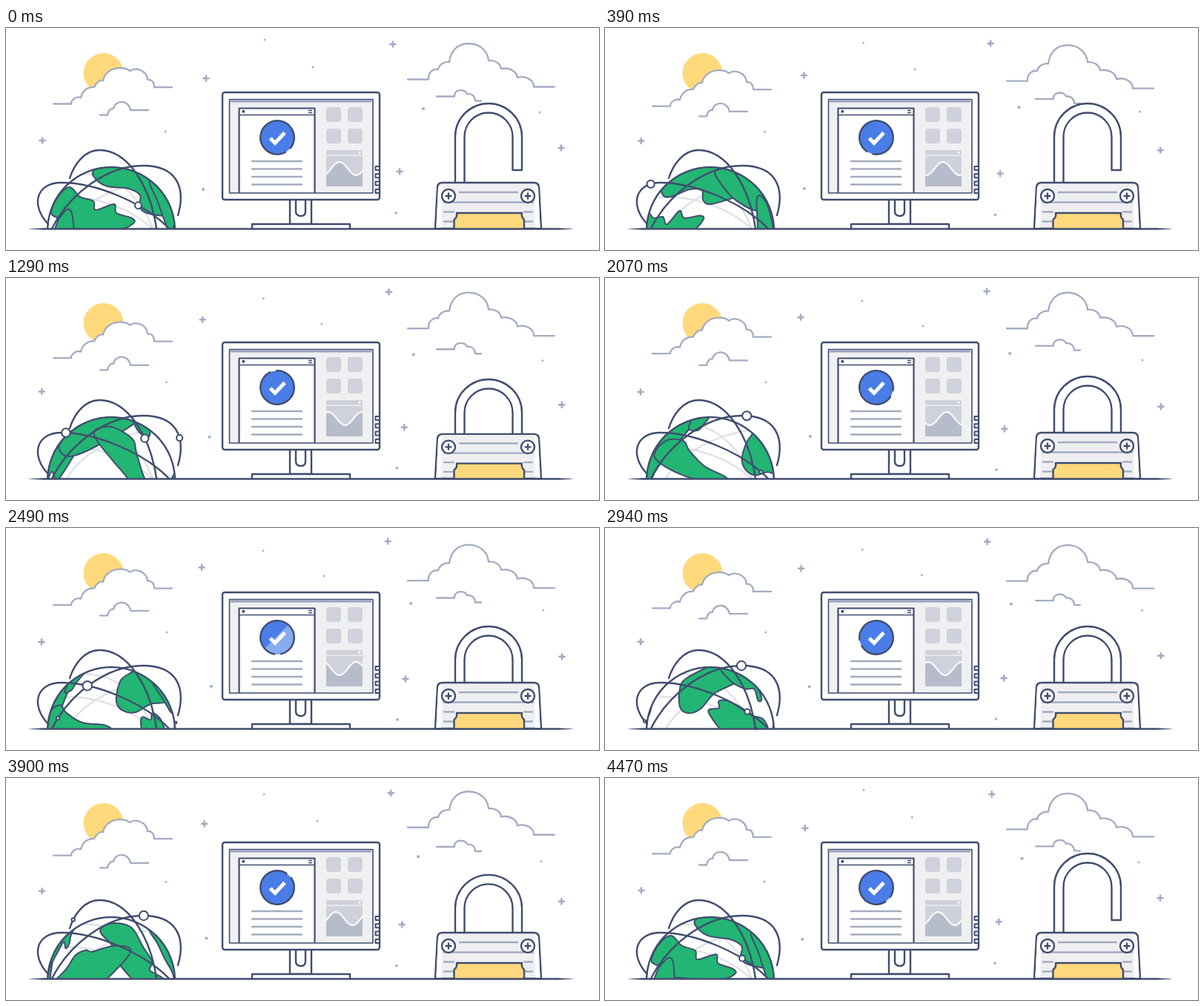
These frames come from a looping animation (800x300 px, 4500 ms). An HTML page:

```html
<!DOCTYPE html>
<html lang="en">
<head>
<meta charset="utf-8">
<title>Secure connection</title>
<style>
  html, body { margin: 0; width: 100%; height: 100%; overflow: hidden; background: #fff; }
  svg { display: block; width: 800px; height: 300px; }
  .ink { fill: none; stroke: #404d6e; stroke-width: 2.4; stroke-linecap: round; stroke-linejoin: round; }
  .white { fill: #fff; }
  .cloud { fill: #fff; stroke: #a3acc3; stroke-width: 2.3; stroke-linecap: round; stroke-linejoin: round; }
  .soft { fill: none; stroke: #a3acbf; stroke-width: 2.4; stroke-linecap: round; }
  .back { fill: none; stroke: #e0e2e7; stroke-width: 2.4; }
  .land { fill: #22b573; stroke: #404d6e; stroke-width: 2; stroke-linejoin: round; }
  .tile { fill: #cfd2dc; }
</style>
</head>
<body>
<svg viewBox="0 0 800 300">
  <defs>
    <clipPath id="above"><rect width="800" height="271"/></clipPath>
    <clipPath id="dome"><circle cx="142" cy="274" r="86"/></clipPath>
    <clipPath id="disc"><circle cx="366" cy="148" r="22"/></clipPath>
    <clipPath id="panel"><rect x="432" y="173" width="49" height="41"/></clipPath>
  </defs>

  <g id="sky"></g>
  <circle cx="131.5" cy="61" r="27" fill="#ffd97b"/>
  <g class="cloud">
    <path id="cloud0" d="M64 102.5H88C88 96 96 92 101 94C103 85 110 79 119 80C122 73 127 70 131 71C133 60 143 54 154 54C160 54 165 56 167 58C176 52 190 58 191 70C196 69 200 73 200 80H224"/>
    <path id="cloud1" d="M127 117.5H137C138 111 142 108 145 109C147 97 165 96 168 111H192"/>
    <path id="cloud2" d="M542 69.5H570C569 60 577 54 583 56C584 49 592 45 598 46C600 30 610 21 624 21C639 21 650 31 651 44C660 43 667 48 668 55C678 53 689 58 690 67C700 64 712 69 712 79.5H740"/>
    <path id="cloud3" d="M581 92.5H605C604 82 620 82 622 89C629 88 633 93 633 98.5H641"/>
  </g>

  <g clip-path="url(#above)">
    <g clip-path="url(#dome)">
      <rect x="50" y="180" width="190" height="100" fill="#fff"/>
      <g class="back">
        <path d="M72 229C110 225 165 240 197 271"/>
        <path d="M82 271C100 240 140 215 196 205"/>
        <path d="M104 198C145 195 180 225 198 271"/>
      </g>
      <g id="lands" class="land"></g>
    </g>
    <circle class="ink" cx="142" cy="274" r="86"/>
  </g>
  <g class="ink">
    <path d="M86 203C92 184 106 165 126 165C165 165 195 215 203 271"/>
    <path d="M220 271C185 235 120 209 75 209C40 209 33 240 57 265"/>
    <path d="M62 271C85 225 135 186 185 186C230 186 243 215 232 253"/>
  </g>
  <g id="nodes" class="ink"></g>

  <g class="ink">
    <path class="white" d="M383 232V265H412V232M391 232V248Q391 254 398 254Q404 254 404 248V232"/>
    <path class="white" d="M332 271V265H464V271"/>
    <rect class="white" x="292" y="87" width="212" height="145" rx="3"/>
    <rect x="301.5" y="96.5" width="193.5" height="126.5" style="fill:#f0f0f2;stroke-width:1.6"/>
    <path d="M303 99H493" style="stroke:#98a2c0;stroke-width:3;stroke-linecap:butt"/>
    <g id="keys" class="white" style="stroke-width:2"></g>
    <path class="white" d="M314.5 222V108.500H416.500V222" style="stroke-width:2.2"/>
    <path d="M315 117.500H416" style="stroke-width:1.6"/>
    <path d="M408.500 111.500H412.500M408.500 114.500H412.500" style="stroke-width:1.4"/>
    <rect x="318.500" y="111" width="3.500" height="3.500" style="fill:#404d6e;stroke:none"/>
  </g>
  <path class="soft" d="M332 180H399M332 190.500H399M332 201H399M332 211.500H399"/>
  <circle cx="366" cy="148" r="22.800" fill="#4a7de8"/>
  <g clip-path="url(#disc)"><g transform="translate(366 148) rotate(45)">
    <rect id="shine" y="-30" width="42" height="60" fill="#fff" opacity=".35"/>
  </g></g>
  <path d="M356.500 149L363 155.500L376 141.500" fill="none" stroke="#fff" stroke-width="5"/>
  <circle id="ring" class="ink" cx="366" cy="148" r="22.800" pathLength="360" stroke-dasharray="342 18" style="stroke-linecap:butt"/>
  <g id="tiles" class="tile">
    <rect x="432" y="165" width="49" height="6.500"/><rect x="432" y="173" width="49" height="41"/>
  </g>
  <circle cx="477" cy="168" r="1.500" fill="#fff"/>
  <path id="wave" clip-path="url(#panel)" fill="#b6bccb" stroke="#fff" stroke-width="2"/>

  <path id="shackle" class="ink white" d="M606 225V147A45 45 0 0 1 696 147V192H683.500V147A32.500 32.500 0 0 0 618.500 147V225"/>
  <g id="lock" class="ink">
    <path d="M579 271L582 215Q582.500 209 589 209H712Q718.500 209 719 215L722 271Z" style="fill:#efeff2"/>
    <path d="M583 215L580.500 270H587L588.500 212ZM718 215L720.500 270H714L712.500 212Z" style="fill:#fff;stroke:none"/>
    <path class="soft" d="M612 222H690M591 235.500H711M591 248.500H604M699 248.500H710M591 261.500H602M701 261.500H710" style="stroke:#a3acc3"/>
    <path d="M604.500 271V259Q609 256 608 250H696Q695 256 699 259V271" style="fill:#ffd97b"/>
    <g id="screw0"><circle class="white" r="9"/><path d="M-3.500 0H3.500M0 -3.500V3.500"/></g>
    <g id="screw1"><circle class="white" r="9"/><path d="M-3.500 0H3.500M0 -3.500V3.500"/></g>
  </g>
  <path d="M29 271.500L50 270.300H745L767 271.500L745 272.700H50Z" fill="#404d6e"/>
</svg>

<script>
const LOOP = 4500, TAU = 2 * Math.PI;
const { sin, cos, hypot, sqrt, atan2 } = Math;
const $ = id => document.getElementById(id);
const clamp = k => Math.max(0, Math.min(1, k));
const ease = k => (1 - cos(Math.PI * clamp(k))) / 2;
const ramp = (t, a, b) => ease((t - a) / (b - a));
const bump = (t, a, b) => sin(Math.PI * clamp((t - a) / (b - a)));

function set(el, attrs) {
  for (const k in attrs) el.setAttribute(k, attrs[k]);
  return el;
}
function add(parent, tag, attrs = {}) {
  const el = document.createElementNS('http://www.w3.org/2000/svg', tag);
  return set($(parent).appendChild(el), attrs);
}
const move = (el, x, y, more = '') => set(el, { transform: `translate(${x} ${y})${more}` });

// Smooth closed curve through points.
function outline(p) {
  const at = i => p[(i + p.length) % p.length];
  return 'M' + p[0] + p.map((b, i) => {
    const a = at(i - 1), c = at(i + 1), e = at(i + 2);
    const h1 = b.map((v, j) => v + (c[j] - a[j]) / 6);
    const h2 = c.map((v, j) => v - (e[j] - b[j]) / 6);
    return `C${h1} ${h2} ${c}`;
  }).join('') + 'Z';
}

// Specks drift out and back: home, then reach.
const star = (...v) => ({ v, el: add('sky', 'path', { d: 'M-3.500 0H3.500M0 -3.500V3.500', stroke: '#a3acc3', 'stroke-width': 2.6, 'stroke-linecap': 'round' }) });
const dot = (r, ...v) => ({ v, el: add('sky', 'circle', { r, fill: '#a3acc3' }) });
const specks = [
  star(270, 68, -6, -15), star(522, 22, -7, -4), star(49, 152, -1, 2),
  star(531, 194, 8, 10), star(749, 162, 1, 12),
  dot(1.4, 349, 16, -2, 15), dot(1.4, 414, 53, 15, 12), dot(1.4, 215, 140, 2, 1),
  dot(2, 266, 218, 11, -4), dot(1.8, 526, 250, 2, 9),
  dot(2, 563, 109, -17, -7), dot(1.4, 720, 114, 5, -3)
];

// Clouds bob twice per loop: amplitude, time of lowest position.
const clouds = [[3.6, 975], [3.6, 1125], [2.6, 540], [3.4, 860]];
const bob = ([amp, low], t) => amp * cos(2 * TAU * (t - low) / LOOP);

// The globe is a sphere turning about an axis that leans away from the viewer.
const cx = 142, cy = 274, R = 86;
const lean = 50 * TAU / 360, C = cos(lean), S = sin(lean);
const spin = t => TAU * t / LOOP + 0.3 * sin(TAU * (t / LOOP - 0.86));

// Coast as seen at time t, kept as height, radius and longitude.
function land(t, coast) {
  const points = coast.split(' ').map(pair => {
    const [px, py] = pair.split(',').map(Number);
    const d = hypot(px - cx, py - cy) / R;
    const k = (d > 1 ? (2 - d) / d : 1) / R;
    const x = (px - cx) * k, y = (cy - py) * k;
    const z = sqrt(Math.max(0, 1 - x * x - y * y)) * (d > 1 ? -1 : 1);
    const v = y * S + z * C;
    return { h: y * C - z * S, r: hypot(x, v), lon: atan2(x, v) + spin(t) };
  });
  return { points, el: add('lands', 'path') };
}
const lands = [
  land(0, '61,250 70,228 86,215 100,228 118,234 121,246 146,238 149,250 170,257 172,264 150,272 80,270 72,258'),
  land(0, '118,193 142,187 175,194 204,214 222,242 225,254 190,250 180,240 181,226 165,217 137,214 122,205'),
  land(810, '105,200 142,188 190,195 205,213 165,228 130,227 112,217'),
  land(2070, '113,203 124,189 142,188 133,198 125,206'),
  land(2490, '149,235 152,213 161,200 188,192 205,214 217,234 195,238 175,249 158,247'),
  land(2400, '57,266 64,240 80,234 88,245 110,260 140,266 145,275 90,280'),
  land(3390, '93,265 101,252 98,243 112,236 145,236 165,230 180,234 187,242 210,254 217,275 150,285'),
  land(3390, '103,198 120,190 150,188 159,199 159,208 152,211 146,199 130,207 110,209')
];
function turnLand({ points, el }, t) {
  let seen = false;
  const p = points.map(({ h, r, lon }) => {
    const a = lon - spin(t), x = r * sin(a), v = r * cos(a);
    const y = h * C + v * S, z = v * C - h * S;
    if (z > 0) seen = true;
    // Hidden points wait just outside the rim.
    const k = R * (z < 0 ? (1.04 - 0.2 * z) / hypot(x, y) : 1);
    return [cx + x * k, cy - y * k];
  });
  set(el, { d: seen ? outline(p) : '' });
}

// Each orbit launches a node at the given times.
const TRIP = 1150;
const nodes = [
  ['M203 271C195 215 165 165 126 165C106 165 92 184 86 203', 880, 2935],
  ['M220 271C185 235 120 209 75 209C40 209 33 240 57 265', 610, 1900, 2650, 4147],
  ['M62 271C85 225 135 186 185 186C230 186 243 215 232 253L228 266', 470, 1420, 2310, 3265]
].flatMap(([d, ...starts]) => {
  const path = add('nodes', 'path', { d, stroke: 'none' });
  return starts.map(start => ({ path, start, len: path.getTotalLength(), el: add('nodes', 'circle', { fill: '#fff', 'stroke-width': 2 }) }));
});
function moveNode({ path, start, len, el }, t) {
  const k = ((t - start + LOOP) % LOOP) / TRIP;
  const f = ease(k), p = path.getPointAtLength(f * len);
  el.style.display = k < 1 ? '' : 'none';
  set(el, { cx: p.x, cy: p.y, r: 1.3 + 5 * sin(Math.PI * f) });
}

for (let i = 0; i < 4; i++) {
  add('keys', 'rect', { x: 498.5, y: 187 + i * 10.3, width: 5.5, height: 5 });
  add('tiles', 'rect', { x: 432 + (i % 2) * 29, y: 107 + (i >> 1) * 29, width: 20, height: 20, rx: 4 });
}

function drawWave(t) {
  const crest = 458 + t * 90 / LOOP + 10 * sin(TAU * (t / LOOP - 0.35));
  let d = 'M429 217';
  for (let x = 429; x <= 484; x += 2.5) d += `L${x} ${190 - 9 * cos(TAU * (x - crest) / 45)}`;
  set($('wave'), { d: d + 'V217Z' });
}

function drawLock(t) {
  const drop = 31 * (ramp(t, 1040, 1250) - ramp(t, 3850, 4150)) + 4 * bump(t, 1150, 1450);
  const squash = 1 - bump(t, 1190, 1450) / 30;
  const twist = 90 * (ramp(t, 540, 1080) + ramp(t, 3120, 3660));
  move($('shackle'), 0, drop);
  move($('lock'), 0, 271, ` scale(1 ${squash}) translate(0 -271)`);
  [597, 704].forEach((x, i) => move($('screw' + i), x, 227, ` rotate(${twist})`));
}

function draw(t) {
  const out = sin(Math.PI * t / LOOP);
  for (const { v: [x, y, dx, dy], el } of specks) move(el, x + dx * out, y + dy * out);
  clouds.forEach((c, i) => move($('cloud' + i), 0, bob(c, t) - bob(c, 0)));
  for (const l of lands) turnLand(l, t);
  for (const n of nodes) moveNode(n, t);
  set($('ring'), { transform: `rotate(${59 + 720 * t / LOOP} 366 148)` });
  set($('shine'), { x: -66 + 92 * clamp((t - 2190) / 430) });
  drawWave(t);
  drawLock(t);
}

const begin = performance.now();
function tick() {
  draw((performance.now() - begin) % LOOP);
  requestAnimationFrame(tick);
}
tick();
</script>
</body>
</html>
```
